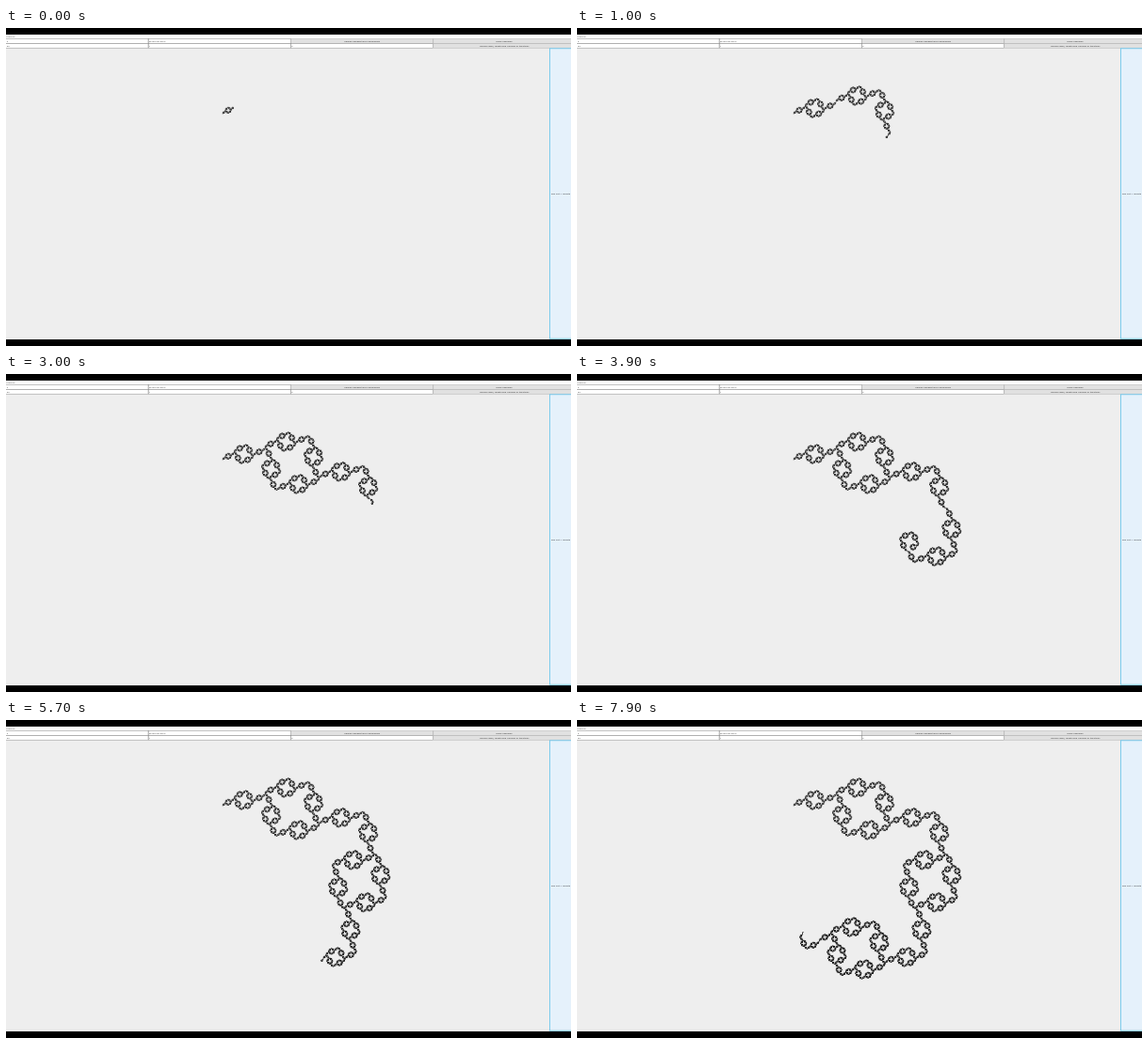
These frames come from a looping animation (600x338 px, 8 s). An HTML page with a canvas:

```html
<!DOCTYPE html>
<html lang="en">
<head>
<meta charset="utf-8">
<title>L-system plotter</title>
<style>
  html, body { margin: 0; width: 100%; height: 100%; overflow: hidden; background: #000; }
  svg, canvas { position: absolute; left: 0; top: 0; width: 600px; height: 338px; }
  text { font-family: "Open Sans", "Noto Sans", sans-serif; font-size: 2.4px; fill: #222; }
  .mid { text-anchor: middle; }
  .field { fill: #fff; stroke: #8a8a8a; stroke-width: .5; }
  .button { fill: #e1e1e1; stroke: #adadad; stroke-width: .5; }
</style>
</head>
<body>
<svg viewBox="0 0 600 338">
  <rect width="600" height="338" fill="#000"/>
  <rect y="7" width="600" height="324" fill="#eee"/>
  <rect y="7" width="600" height="4.5" fill="#fff"/>
  <text x=".4" y="10">F+F+F+F</text>

  <rect class="field" x="-1" y="11.7" width="152" height="4.6"/>
  <rect class="field" x="151.4" y="11.7" width="151" height="4.6"/>
  <rect class="button" x="302.6" y="11.7" width="151" height="4.6"/>
  <rect class="button" x="453.8" y="11.7" width="147" height="4.6"/>
  <text x=".8" y="15">F</text>
  <text x="152" y="15">FF+F+F+F+F+F-F</text>
  <text class="mid" x="378" y="15">Upload Alphabet and Axiom/Rules</text>
  <text class="mid" x="529" y="15">Draw Unknown</text>

  <rect class="field" x="-1" y="16.6" width="152" height="4.6"/>
  <rect class="field" x="151.4" y="16.6" width="151" height="4.6"/>
  <rect class="field" x="302.6" y="16.6" width="151" height="4.6"/>
  <rect class="button" x="453.8" y="16.6" width="147" height="4.6"/>
  <text x=".8" y="19.9">90</text>
  <text x="152" y="19.9">1</text>
  <text x="303.2" y="19.9">5</text>
  <text class="mid" x="529" y="19.9">Upload Angle, Length and Number of Iterations</text>

  <rect x="577.6" y="21.8" width="23.5" height="308.4" fill="#e5f1fb" stroke="#62c3ec" stroke-width=".8"/>
  <text class="mid" x="589" y="176.9">Run Plot + Update</text>
</svg>
<canvas id="view" width="600" height="338"></canvas>
<script>
const RULE = 'FF+F+F+F+F+F-F';
const DEPTH = 5;
const SIDES = 3;
const LOOP = 8000, TICK = 100;
const SCREEN_W = 1280, SCREEN_H = 720;

// Steps completed at given times (ms); nearly constant speed.
const PROGRESS = [[0, 490], [1000, 12400], [3000, 36520], [3900, 47410],
  [5700, 69235], [6600, 80000], [7900, 95820], [8000, 97030]];

function tracePath() {
  const points = [];
  let x = 490, y = 195, dx = 0, dy = -1;
  const turn = s => { [dx, dy] = [-s * dy, s * dx]; };
  const walk = depth => {
    if (!depth) {
      x += dx;
      y += dy;
      points.push([x, y]);
      return;
    }
    for (const c of RULE) {
      if (c === 'F') walk(depth - 1);
      else turn(c === '+' ? 1 : -1);
    }
  };
  for (let i = 0; i < SIDES; i++) {
    walk(DEPTH);
    turn(1);
  }
  return points;
}

function stepsAt(t) {
  const i = PROGRESS.findIndex(p => p[0] > t);
  const [t0, n0] = PROGRESS[i - 1], [t1, n1] = PROGRESS[i];
  return Math.round(n0 + (n1 - n0) * (t - t0) / (t1 - t0));
}

const points = tracePath();
const screen = document.createElement('canvas');
screen.width = SCREEN_W;
screen.height = SCREEN_H;
const pen = screen.getContext('2d');
const view = document.getElementById('view').getContext('2d');
view.imageSmoothingQuality = 'high';
let drawn = 0, shown = -1;

function render(time) {
  const t = Math.floor(time % LOOP / TICK) * TICK;
  if (t === shown) return;
  shown = t;
  const steps = stepsAt(t);
  if (steps < drawn) {
    pen.clearRect(0, 0, SCREEN_W, SCREEN_H);
    drawn = 0;
  }
  for (; drawn < steps; drawn++) {
    // The ink darkens slightly along the curve.
    if (drawn % 512 === 0 || pen.fillStyle === '#000000') {
      const ink = Math.round(42 - 32 * drawn / points.length);
      pen.fillStyle = `rgb(${ink},${ink},${ink})`;
    }
    pen.fillRect(points[drawn][0], points[drawn][1], 1, 1);
  }
  view.clearRect(0, 0, 600, 338);
  view.drawImage(screen, 0, 0, 600, 337.5);
}

const start = performance.now();
function frame() {
  render(performance.now() - start);
  requestAnimationFrame(frame);
}
frame();
</script>
</body>
</html>
```
